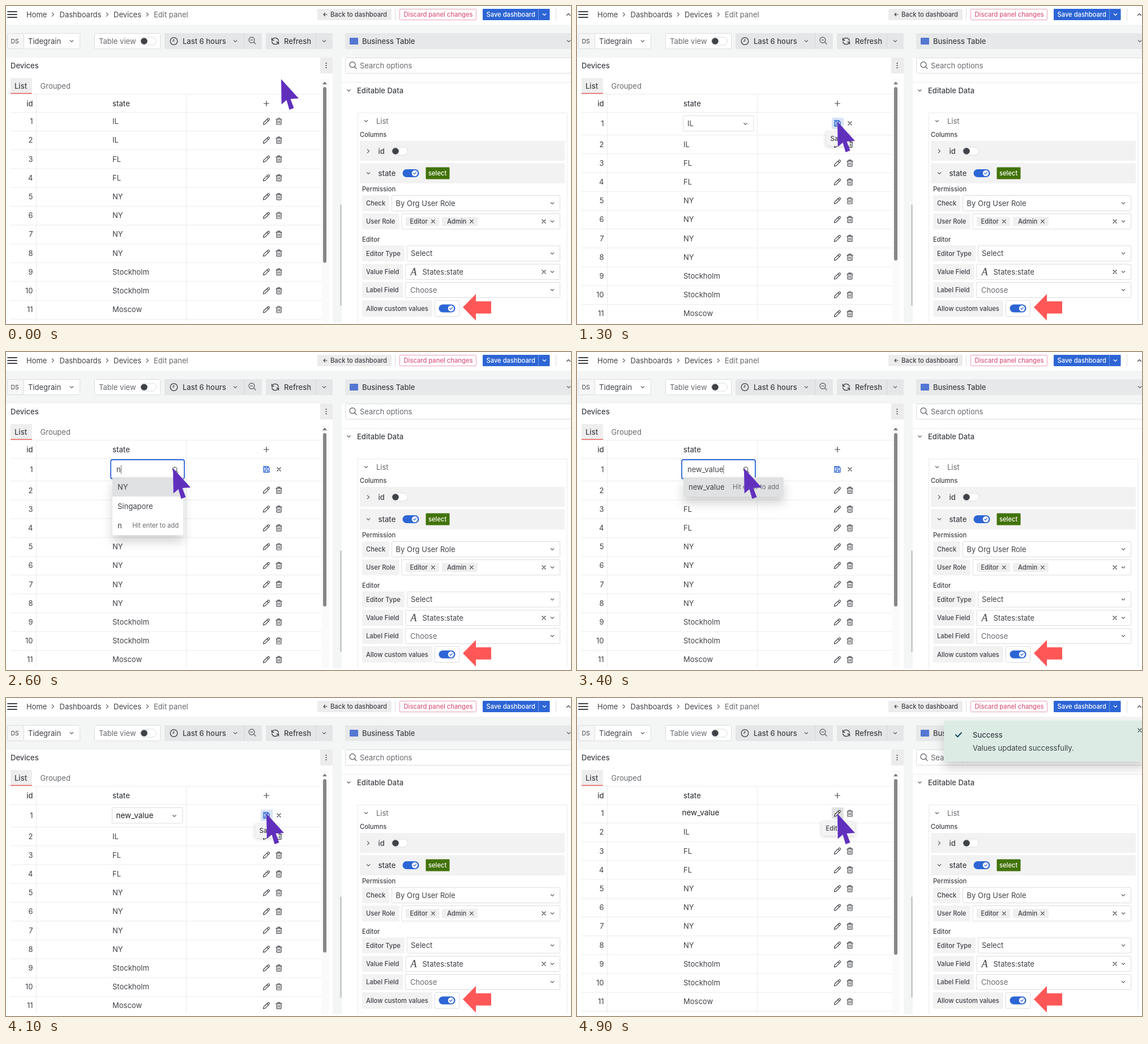
These frames come from a looping animation (998 by 561 pixels, 5300 ms). An HTML page:

```html
<!DOCTYPE html>
<html lang="en">
<head>
<meta charset="utf-8">
<title>Editable table</title>
<style>
  html, body { margin: 0; width: 100%; height: 100%; overflow: hidden; background: #fff; }
  svg { display: block; width: 100%; height: 100%; }
  text { font-family: Inter, Roboto, sans-serif; white-space: pre; }
  .float { filter: drop-shadow(0 11px 9px rgba(24, 26, 27, .2)); }
  .tip { filter: drop-shadow(0 1px 3px rgba(0, 0, 0, .2)); }
</style>
</head>
<body>
<svg viewBox="0 0 998 561">
  <defs><clipPath id="table"><rect y="120" width="577" height="437"/></clipPath></defs>
  <g id="page"></g>
  <g id="live" clip-path="url(#table)"></g>
  <g id="overlay"></g>
  <path id="cursor" fill="#6030bd" d="M0 0 .7 44.5 9.5 37 14.5 54 22.5 51 16.5 35 31 34Z"/>
</svg>
<script>
const INK = '#3f4247', SOFT = '#66696e', LINE = '#dcdddf', PALE = '#f2f2f3', BLUE = '#2d65d5';
const LOOP = 5300, STEP = 100, PITCH = 33.2;
const $ = id => document.getElementById(id);

// y is the middle of the capitals
const text = (x, y, str, { size = 13, fill = INK, weight = 400, anchor = 'start' } = {}) =>
  `<text x="${x}" y="${y + size * .36}" font-size="${size}" fill="${fill}" font-weight="${weight}" text-anchor="${anchor}">${str}</text>`;
const label = (x, y, str, fill = INK) => text(x, y, str, { size: 11.2, weight: 500, fill });
const rect = (x1, y1, x2, y2, fill, stroke = 'none', r = 1, width = 1) =>
  `<rect x="${x1}" y="${y1}" width="${x2 - x1}" height="${y2 - y1}" rx="${r}" fill="${fill}" stroke="${stroke}" stroke-width="${width}"/>`;
const box = (x1, y1, x2, y2, fill = '#fff', stroke = LINE) => rect(x1 + .5, y1 + .5, x2 - .5, y2 - .5, fill, stroke);
const path = (x, y, d, stroke = INK, width = 1.2, fill = 'none') =>
  `<path transform="translate(${x} ${y})" d="${d}" fill="${fill}" stroke="${stroke}" stroke-width="${width}" stroke-linecap="round" stroke-linejoin="round"/>`;
const line = (x1, y1, x2, y2, stroke = '#ebeced') => path(0, 0, `M${x1} ${y1}L${x2} ${y2}`, stroke, 1);
const circle = (x, y, r, fill, stroke = 'none') =>
  `<circle cx="${x}" cy="${y}" r="${r}" fill="${fill}" stroke="${stroke}" stroke-width="1.3"/>`;

const down = (x, y, c = SOFT) => path(x, y, 'M-2.7-1.3 0 1.3 2.7-1.3', c);
const right = (x, y) => path(x, y, 'M-1.7-3 1.5 0-1.7 3', SOFT);
const cross = (x, y, r = 3) => path(x, y, `M${-r} ${-r}L${r} ${r}M${r} ${-r}L${-r} ${r}`);
const lens = (x, y, r = 5) => circle(x - 1, y - 1, r, 'none', SOFT) + path(x - 1, y - 1, `M${r * .72} ${r * .72}L${r + 2} ${r + 2}`, SOFT, 1.4);
const pencil = (x, y) => path(x, y, 'M-5.5 5.5-4.8 2 2.6-5Q3.8-6 5-4.8 6-3.6 5 -2.5L-2.2 4.7ZM1-3.4 3.5-1');
const trash = (x, y) => path(x, y, 'M-5-3.5H5M-2-3.5V-5.5H2V-3.5M-4-3.5V4.5Q-4 5.5-3 5.5H3Q4 5.5 4 4.5V-3.5M-1.4-.8V3M1.4-.8V3');
const floppy = (x, y) => path(x, y, 'M-5-5H2.5L5-2.5V5H-5ZM-2.5-5V-2H2V-5M-2.5 5V1H2.5V5', BLUE, 1.4);
const toggle = (x, y, on) => on
  ? rect(x, y - 7, x + 29, y + 7, BLUE, 'none', 7) + circle(x + 21.5, y, 5.2, '#fff') + path(x + 21.5, y, 'M-2.3 0-.7 1.7 2.4-1.5', BLUE)
  : rect(x + .5, y - 7, x + 28.5, y + 7, '#fff', LINE, 7) + circle(x + 7, y, 5.8, INK);

const field = (y, name, split, value, color = INK) =>
  rect(629, y - 14, split - 4, y + 14, PALE) + label(636, y, name) +
  box(split, y - 14, 979, y + 14) + down(965, y) + value(y, color);

function header() {
  const crumbs = [[36, 'Home'], [94.5, 'Dashboards'], [190, 'Devices']];
  return [10, 15, 20].map(y => path(3, y, 'M0 0H16', INK, 1.8)).join('') +
    crumbs.map(([x, s]) => text(x, 15, s)).join('') + text(261, 15, 'Edit panel', { fill: SOFT }) +
    [83, 179, 250].map(x => right(x, 15)).join('') +
    rect(550, 5, 681, 25, '#ececed') + path(564, 15, 'M3 0H-3M-.5-2.5-3 0-.5 2.5') + label(573, 15, 'Back to dashboard') +
    line(687.5, 5, 687.5, 25, LINE) +
    box(695, 5, 831, 25, '#fff', '#e7a0b4') + label(702.5, 15, 'Discard panel changes', '#da5a80') +
    rect(842, 5, 960.5, 25, BLUE) + label(848.5, 15, 'Save dashboard', '#fff') +
    line(940.5, 5, 940.5, 25, '#6f97e6') + down(951, 15, '#fff') +
    line(971.5, 5, 971.5, 25, LINE) + path(993.5, 15, 'M-3 1.5 0-1.5 3 1.5');
}

function toolbar() {
  return rect(0, 33, 998, 91, '#f4f5f5', 'none', 0) +
    box(2, 48, 32, 76, '#f6f6f7') + text(8.5, 62, 'DS', { size: 10.5 }) +
    box(31, 48, 131, 76) + text(39, 62, 'Tidegrain') + down(116, 62) +
    box(156, 48, 273, 76) + text(164, 62, 'Table view', { fill: SOFT }) + toggle(237, 62, false) +
    rect(280, 48, 452, 76, '#e5e6e7') + line(420.5, 48, 420.5, 76, '#d9dadb') +
    circle(296.5, 62, 6.3, 'none', INK) + path(296.5, 62, 'M0-3.5V0H-2.5') +
    text(312, 62, 'Last 6 hours', { weight: 500 }) + down(405, 62) + lens(435, 61) + path(434, 60, 'M-2 0H2') +
    rect(459, 48, 577, 76, '#e5e6e7') + line(547.5, 48, 547.5, 76, '#d9dadb') +
    path(475.5, 62, 'M-6-5V-1.5H-2.5M-5.6-1.8A6 6 0 0 1 5.8-1M6 5V1.5H2.5M5.6 1.8A6 6 0 0 1-5.8 1', INK, 1.4) +
    text(491, 62, 'Refresh', { weight: 500 }) + down(562, 62);
}

function panel() {
  return rect(577, 91, 593, 558, '#f4f5f5', 'none', 0) +
    text(8, 105, 'Devices', { weight: 500 }) + rect(555, 91, 577, 119, '#ececed') +
    [101, 105, 109].map(y => circle(565.5, y, 1.1, INK)).join('') +
    rect(8, 127, 46, 154, '#eeeeef') + rect(8, 153.5, 46, 155, '#f0645a', 'none', 0) +
    text(15, 141, 'List', { weight: 500 }) + text(60.5, 141, 'Grouped', { fill: SOFT }) +
    rect(557, 128, 570, 558, '#fafafa', 'none', 0) + path(563, 136, 'M-3 1.5 0-2 3 1.5Z', '#777', 1, '#777');
}

function options() {
  const value = (x, s) => (y, color) => text(x, y, s, { fill: color });
  const chip = (x1, x2, tx, s, y) => rect(x1, y - 8, x2, y + 8, '#efeff0') + label(tx, y, s) + cross(x2 - 10.5, y, 2.8);
  const roles = y => chip(706, 765, 713.5, 'Editor', y) + chip(770, 833, 779, 'Admin', y) + cross(950, y);
  const source = y => `<text x="714.5" y="${y + 6}" style="font:italic 18px 'Liberation Serif',serif" fill="${INK}">A</text>` +
    text(735.5, y, 'States:state') + cross(950, y);
  return rect(599, 48, 998, 76, '#e7e8e9') + rect(607, 56, 622, 68, '#5577d2') +
    text(629, 62, 'Business Table', { weight: 500 }) + down(994, 62) +
    box(599, 91, 1010, 119) + lens(613, 104.5) + text(625, 105, 'Search options', { fill: SOFT }) +
    line(593.5, 134.5, 998, 134.5) + down(605.5, 149) + text(620, 149, 'Editable Data', { weight: 500 }) +
    rect(590, 350, 593, 529, '#cbcccd', 'none', 1.5) +
    path(621.5, 188.5, 'M0 369V0H369.5V369', '#e9eaeb', 1) +
    down(636, 203) + text(654, 203, 'List', { fill: SOFT }) + label(625, 227, 'Columns') +
    rect(625, 238, 987, 273, PALE) + right(640, 256) + text(657.5, 256, 'id', { weight: 500 }) + toggle(681, 256, false) +
    rect(625, 277, 987, 313, PALE) + down(640, 295) + text(657.5, 295, 'state', { weight: 500 }) + toggle(700.5, 295, true) +
    rect(741.5, 284.5, 783.5, 305.5, '#427309') + label(746, 295, 'select', '#fff') +
    label(629, 323, 'Permission') +
    field(348, 'Check', 681, value(688.5, 'By Org User Role')) +
    field(380, 'User Role', 698.5, roles) +
    label(629, 411.5, 'Editor') +
    field(436.5, 'Editor Type', 708, value(715, 'Select')) +
    field(469, 'Value Field', 705.5, source) +
    field(501, 'Label Field', 705, value(714, 'Choose'), SOFT) +
    rect(629, 519, 753, 548, PALE) + label(636, 533.5, 'Allow custom values') +
    box(757, 519, 801, 548) + toggle(764.5, 533.5, true) +
    '<path fill="#ff5757" d="M807 531.5 830 508V521H857V542.5H830V555Z"/>';
}

const STATES = ['IL', 'IL', 'FL', 'FL', 'NY', 'NY', 'NY', 'NY', 'Stockholm', 'Stockholm', 'Moscow', 'Moscow'];
const CHOICES = ['IL', 'FL', 'NY', 'Stockholm', 'Moscow', 'Singapore', 'Tokyo', 'Paris'];
const TYPED = [[3200, 'new_value'], [3100, 'new_val'], [3000, 'new_'], [2800, 'new'], [2700, 'ne'], [2500, 'n']];
const typedAt = t => TYPED.find(([start]) => t >= start)?.[1] ?? '';
const newValue = (x, y) => text(x, y, 'new_value', { size: 13.5, fill: '#202226' });

function tip(x1, y1, x2, str) {
  return `<g class="tip">${rect(x1, y1, x2, y1 + 25, '#f3f3f4', 'none', 2)}</g>` + label(x1 + 7.5, y1 + 12, str);
}

function select(t) {
  const focused = t >= 2200 && t < 3600;
  if (!focused) {
    return box(187, 193, 312.5, 221.5) + down(297.5, 208) +
      (t < 3600 ? text(195, 207, 'IL') : newValue(194.5, 207.5));
  }
  const typed = typedAt(t);
  const caret = typed && '<tspan dx="-1.5" font-weight="300">|</tspan>';
  return rect(185, 190, 315, 223.5, '#fff', BLUE, 3, 1.8) + text(195, 207, (typed || 'IL') + caret) + lens(299, 208, 3.8);
}

function menu(t) {
  if (t < 2300 || t >= 3600) return '';
  const typed = typedAt(t);
  const items = CHOICES.filter(c => c.toLowerCase().includes(typed));
  const rows = typed ? [...items, typed] : items;
  const end = 188 + Math.max(125, 113 + 7.1 * typed.length);
  const height = Math.min(260, rows.length * 34.1);
  return `<g class="float">${rect(188, 221, end, 221 + height, '#fff')}</g>` +
    rect(188, 221, end, 255, '#e0e1e2') +
    rows.map((s, i) => text(197, 238 + 34 * i, s)).join('') +
    (typed ? text(end - 8, 238 + 34 * items.length, 'Hit enter to add', { size: 11.2, fill: SOFT, anchor: 'end' }) : '');
}

function table(t) {
  const editing = t >= 1200 && t < 4500, saved = t >= 4500;
  const grow = editing ? 7.2 : 0;
  const hoverEdit = t >= 700 && t < 1200 || t >= 4800;
  const hoverSave = t >= 1300 && t < 1700 || t >= 4100 && t < 4500;
  let out = rect(560, 143, 566, editing ? 449 : 453, '#858688', 'none', 3) +
    line(8, 155.5, 557, 155.5) + line(8, 187.5, 557, 187.5) +
    line(53.5, 156, 53.5, 557) + line(318.5, 156, 318.5, 557) +
    text(47.5, 172, 'id', { weight: 500, anchor: 'end' }) + text(188, 172, 'state', { weight: 500 }) +
    path(460, 172, 'M-4.5 0H4.5M0-4.5V4.5');
  STATES.forEach((state, i) => {
    const first = i === 0;
    const y = 203.5 + PITCH * i + (first ? grow / 2 : grow);
    const bottom = 220.5 + PITCH * i + grow;
    out += line(8, bottom, 557, bottom) + text(47.5, y, i + 1, { anchor: 'end' });
    if (first && editing) {
      out += select(t) + (hoverSave ? rect(450, 197, 471, 217, '#d9e4f8') : '') + floppy(460, 207) + cross(482, 207);
      return;
    }
    out += first && saved ? newValue(185.5, 202.5) : text(188, y, state);
    if (first && hoverEdit) out += rect(450, 193, 471, 213, t === 700 ? '#eeeeef' : '#e0e1e2');
    out += pencil(460, y) + trash(482, y);
  });
  return out + menu(t) +
    (hoverEdit ? tip(432, 218, 491, 'Edit') : '') + (hoverSave ? tip(440, 222, 481, 'Save') : '');
}

function toast(t) {
  if (t < 4600) return '';
  return `<g class="float">${rect(648, 40, 1002, 112, '#dcece5', 'none', 2)}</g>` +
    path(674, 65, 'M-5 0-1.7 3.5 5-3.7', '#1d4c63', 2) +
    text(699, 65, 'Success', { weight: 500 }) + text(699, 88.5, 'Values updated successfully.') + cross(994, 57);
}

// Each move takes six ticks and eases out quadratically
const MOVES = [[200, 460, 204], [1700, 295, 205], [3600, 460, 204]];
function cursorAt(t) {
  let x = 486, y = 129;
  for (const [start, toX, toY] of MOVES) {
    if (t < start) break;
    const k = Math.min(1, ((t - start) / STEP + 1) / 6), ease = 1 - (1 - k) ** 2;
    x += (toX - x) * ease;
    y += (toY - y) * ease;
  }
  return [x, y];
}

$('page').innerHTML = header() + toolbar() + panel() + options();

let shown = -1;
function tick() {
  const t = Math.floor(performance.now() % LOOP / STEP) * STEP;
  if (t !== shown) {
    shown = t;
    $('live').innerHTML = table(t);
    $('overlay').innerHTML = toast(t);
    $('cursor').setAttribute('transform', `translate(${cursorAt(t)})`);
  }
  requestAnimationFrame(tick);
}
tick();
</script>
</body>
</html>
```
